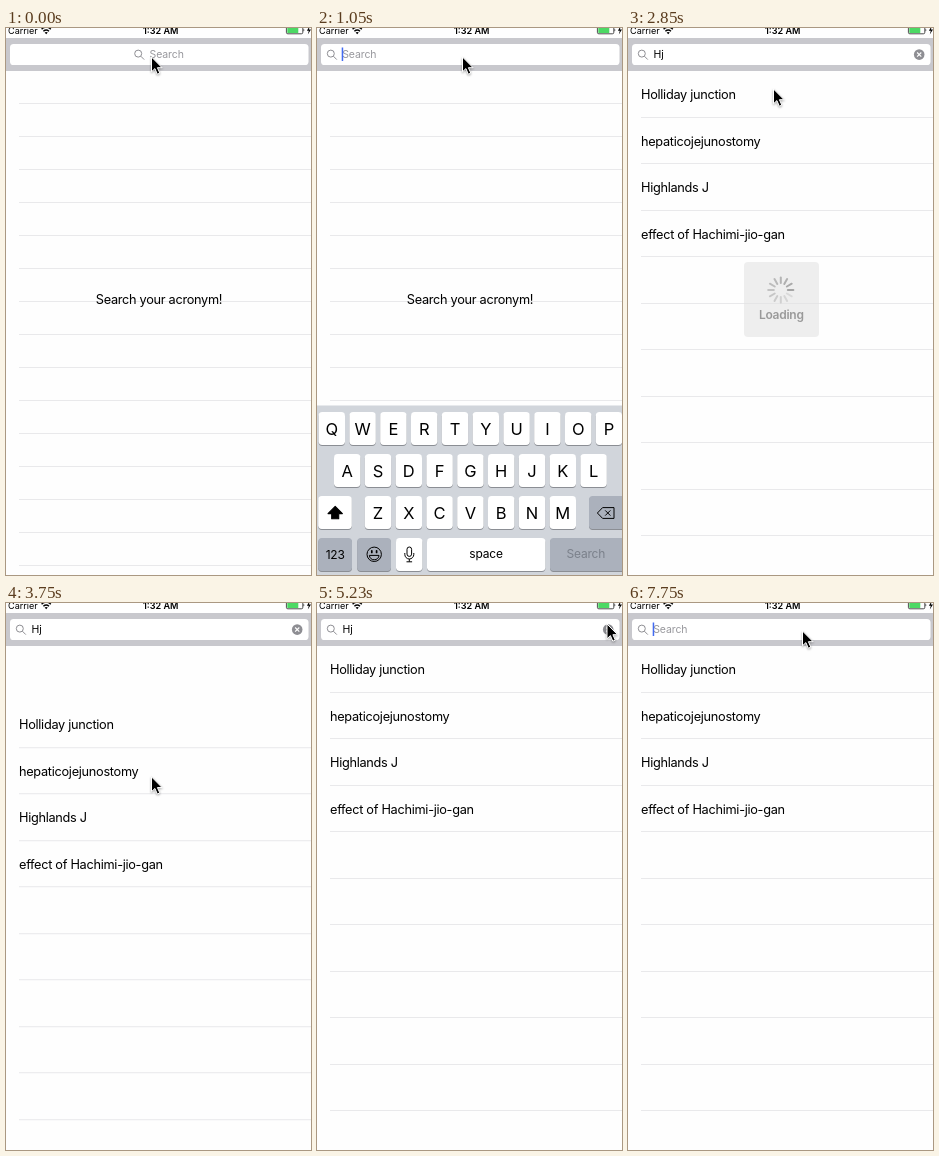
These frames come from a looping animation (305x547 px, 8000 ms). An HTML page:

```html
<!DOCTYPE html>
<html lang="en">
<head>
<meta charset="utf-8">
<title>Acronym search</title>
<style>
  html, body { margin: 0; width: 100%; height: 100%; overflow: hidden; background: #fefefe; }
  svg { display: block; width: 100vw; height: 100vh; font-family: Inter, Roboto, sans-serif; }
  .body { font-size: 12.75px; letter-spacing: -.3px; }
  .field { font-size: 10.5px; letter-spacing: -.11px; }
  .label { font-size: 12px; letter-spacing: -.2px; text-anchor: middle; }
  .status { font-size: 9.1px; }
  .mid { text-anchor: middle; }
  .line { fill: none; stroke: #000; stroke-linejoin: round; }
</style>
</head>
<body>
<svg id="stage" viewBox="0 0 305 547">
  <rect width="305" height="547" fill="#fefefe"/>
  <g id="empty"></g>
  <g id="results"></g>

  <rect width="305" height="10" fill="#fefefe"/>
  <rect y="10" width="305" height="33" fill="#c8c8cd"/>
  <rect x="4" y="16" width="298.5" height="21" rx="3.6" fill="#fff"/>

  <text class="status" x="2" y="6.4">Carrier</text>
  <text class="status mid" x="154.7" y="6.4" font-weight="600">1:32 AM</text>
  <path class="line" stroke-width="1.4" d="M35.6 1.2Q40.2 -3 44.8 1.2M37.4 3.2Q40.2 .8 43 3.2"/>
  <path d="M38.6 4.6Q40.2 3.4 41.8 4.6L40.2 6.3Z"/>
  <rect class="line" x="280.4" y="-1.6" width="16.4" height="7.4" rx="1.4" stroke-width=".7"/>
  <rect x="281.3" y="-.8" width="11" height="5.8" rx=".6" fill="#4cd964"/>
  <path d="M297.6 .8Q299 2.1 297.6 3.4ZM303.6 -2L300.9 2.8H302.8L301.8 6.4L305 1.6H303Z"/>

  <g id="hint">
    <path d="M128.7 25.6a3.5 3.5 0 1 1 7 0a3.5 3.5 0 1 1 -7 0M134.8 28.2l3.4 3.4" fill="none" stroke="#8e8e93"/>
    <text id="holder" class="field" x="143.6" y="30.2" fill="#98989d">Search</text>
  </g>
  <text id="typed" class="field" x="25.6" y="30.2"></text>
  <rect id="caret" y="19.5" width="1.5" height="13.5" fill="#426bf2"/>
  <g id="clear">
    <circle cx="291.2" cy="26.6" r="5.3" fill="#8e8e93"/>
    <path d="M289.1 24.5l4.2 4.2m0 -4.2l-4.2 4.2" stroke="#fff" stroke-width="1.1"/>
  </g>

  <g id="hud">
    <rect x="116" y="234" width="75" height="75" rx="4" fill="#e2e2e2"/>
    <g id="spinner" transform="translate(152.8 262)"></g>
    <text class="mid" x="153.3" y="291" font-size="12" font-weight="600" letter-spacing="-.25" fill="#484848">Loading</text>
  </g>

  <g id="board"><rect y="377.5" width="305" height="170" fill="#d1d5db"/></g>

  <path id="pointer" d="M0 0V14.8L3.4 11.6L5.8 17.2L8.3 16.1L5.9 10.7H10.6Z" stroke="#fff"
    stroke-linejoin="round" style="filter:drop-shadow(0 1px 1px rgba(0,0,0,.35))"/>
</svg>

<script>
const LOOP = 8000;
const $ = id => document.getElementById(id);

function add(parent, tag, attrs, text) {
  const el = document.createElementNS('http://www.w3.org/2000/svg', tag);
  set(el, attrs);
  if (text) el.textContent = text;
  parent.appendChild(el);
  return el;
}
function set(el, attrs) {
  for (const k in attrs) el.setAttribute(k, attrs[k]);
}
const show = (el, on) => el.style.display = on ? '' : 'none';
const move = (el, x, y) => set(el, { transform: `translate(${x} ${y})` });

// Table rows
function rules(parent, pitch) {
  for (let y = 42 + pitch; y < 547; y += pitch)
    add(parent, 'rect', { x: 13, y: Math.round(y), width: 292, height: 1, fill: '#e9e9eb' });
}
rules($('empty'), 33);
add($('empty'), 'text', { class: 'body mid', x: 153, y: 276 }, 'Search your acronym!');
rules($('results'), 46.5);
['Holliday junction', 'hepaticojejunostomy', 'Highlands J', 'effect of Hachimi-jio-gan'].forEach((s, i) =>
  add($('results'), 'text', { class: 'body', x: 13, y: Math.round(71 + 46.5 * i) }, s));

// Spinner
const SPOKES = 12;
const spokes = Array.from({ length: SPOKES }, (_, i) =>
  add($('spinner'), 'path', { d: 'M0 -7V-12.6', stroke: '#505050', 'stroke-width': 2,
    'stroke-linecap': 'round', transform: `rotate(${i * 360 / SPOKES})` }));

// Keyboard
const board = $('board'), DARK = '#abb1bc', PITCH = 30.8;
const rowY = r => 384 + 42 * r;

function key(x, r, w, fill = '#fff') {
  const box = { x, y: rowY(r), width: w, height: 33, rx: 3.7, fill };
  add(board, 'rect', { ...box, y: box.y + .9, fill: '#8b8e94' });
  return add(board, 'rect', box);
}
function label(x, text, y = 529.5) {
  return add(board, 'text', { class: 'label', x, y }, text);
}
function icon(d, attrs) {
  return add(board, 'path', { class: 'line', d, ...attrs });
}

const letters = [];
['QWERTYUIOP', 'ASDFGHJKL', 'ZXCVBNM'].forEach((row, r) => {
  [...row].forEach((c, i) => {
    const x = 153.4 + PITCH * (i - (row.length - 1) / 2);
    key(x - 13.2, r, 26.4);
    letters.push({ c, y: rowY(r), el: add(board, 'text', { class: 'mid', x }) });
  });
});

const shiftKey = key(1.2, 2, 33.6);
const shiftIcon = icon('M18.2 478.4l7.2 7.2h-3.7v5.2h-7v-5.2h-3.7z', { 'stroke-width': 1.1 });
key(272, 2, 40, DARK);
icon('M280.4 485l5.2 -5.4h11.4v10.8h-11.4zM288.2 482.4l5.2 5.2m0 -5.2l-5.2 5.2');

key(1.2, 3, 33.8, DARK);
label(18.2, '123', 530.6);
key(40.2, 3, 33.8, DARK);
add(board, 'circle', { class: 'line', cx: 57.2, cy: 526.3, r: 7.2 });
icon('M52.4 527.4h9.6a4.8 4.4 0 0 1 -9.6 0z');
icon('M54.8 522.8v1.6m4.8 -1.6v1.6', { 'stroke-width': 1.7, 'stroke-linecap': 'round' });
key(79, 3, 26.4);
icon('M90 521.3a2.3 2.3 0 0 1 4.6 0v4.8a2.3 2.3 0 0 1 -4.6 0zM87.8 525v1.4a4.5 4.6 0 0 0 9 0v-1.4M92.3 531v2.6m-2.8 .2h5.6');
key(110, 3, 118.4);
label(169, 'space');
const goKey = key(233, 3, 80);
const goText = label(268.8, 'Search');

// Timing
const clamp = u => Math.min(1, Math.max(0, u));
const easeOut = u => 1 - (1 - clamp(u)) ** 2;
const smooth = u => (u = clamp(u), u * u * (3 - 2 * u));
const rubber = d => 504 * (1 - 1 / (1 + d * .55 / 504));

const TYPE_H = 1500, TYPE_J = 2250, SEARCH = 2550, FOUND = 2850, DRAG = 3300, DROP = 4050, WIPE = 5660;

// Pointer stops: [time, x, y]
const STOPS = [
  [SEARCH, 145.5, 29], [FOUND, 145.5, 61], [3200, 145.5, 61], [DROP, 145.5, 219], [4200, 145.5, 219],
  [4350, 199.5, 104], [4790, 291, 7], [5230, 290, 21], [5500, 290, 21], [5850, 245, 35], [6400, 174.5, 28]
];
function pointer(t) {
  const n = STOPS.findIndex(s => s[0] > t);
  if (n <= 0) return STOPS.at(n).slice(1);
  const [t0, x0, y0] = STOPS[n - 1], [t1, x1, y1] = STOPS[n];
  const u = smooth((t - t0) / (t1 - t0));
  return [x0 + (x1 - x0) * u, y0 + (y1 - y0) * u];
}

// The picture advances in ticks of about 150 ms
function tick(t) {
  return t < 4350 ? Math.floor(t / 150) * 150 : 4350 + Math.floor((t - 4350) / 148 + .1) * 148;
}

function pull(t, y) {
  if (t < DRAG) return 0;
  if (t < DROP) return rubber(y - 61);
  const shift = 73.7 * Math.exp(-(((t - DROP) / 209) ** 2));
  return shift < .5 ? 0 : shift;
}

function draw(time) {
  const t = tick(time);
  const focus = easeOut((t - 560) / 490);
  const up = focus * (1 - smooth((t - 2500) / 350));
  const text = t < TYPE_H || t >= WIPE ? '' : t < TYPE_J ? 'H' : 'Hj';
  const caps = t < TYPE_H + 150;
  const [x, y] = pointer(t);

  move($('pointer'), x, y);
  show($('empty'), t < FOUND);
  show($('results'), t >= FOUND);
  move($('results'), 0, pull(t, y));

  move($('hint'), -118.4 * focus, 0);
  show($('holder'), !text);
  $('typed').textContent = text;
  show($('clear'), text);
  show($('caret'), t >= 900 && t < 2400 || t >= WIPE);
  set($('caret'), { x: 24.7 + 8 * text.length, opacity: clamp((Math.abs(t - 7412) - 120) / 200) });

  show($('hud'), t >= SEARCH && t < FOUND + 150);
  set($('hud'), { opacity: t < FOUND ? .95 : .55 });
  const turn = Math.floor(t / 83) + 6;
  spokes.forEach((s, i) => set(s, { opacity: .25 + .65 * ((i - turn % SPOKES + SPOKES) % SPOKES) / 11 }));

  show(board, up > 0);
  move(board, 0, 170 * (1 - up));
  for (const { c, y, el } of letters) {
    el.textContent = caps ? c : c.toLowerCase();
    set(el, { y: y + (caps ? 22.6 : 21.4), 'font-size': caps ? 16.5 : 18 });
  }
  set(shiftKey, { fill: caps ? '#fff' : DARK });
  shiftIcon.style.fill = caps ? '#000' : 'none';
  set(goKey, { fill: text ? '#007aff' : DARK });
  set(goText, { fill: text ? '#fff' : '#7b818b' });
}

const start = performance.now();
function frame() {
  draw((performance.now() - start) % LOOP);
  requestAnimationFrame(frame);
}
frame();
</script>
</body>
</html>
```
